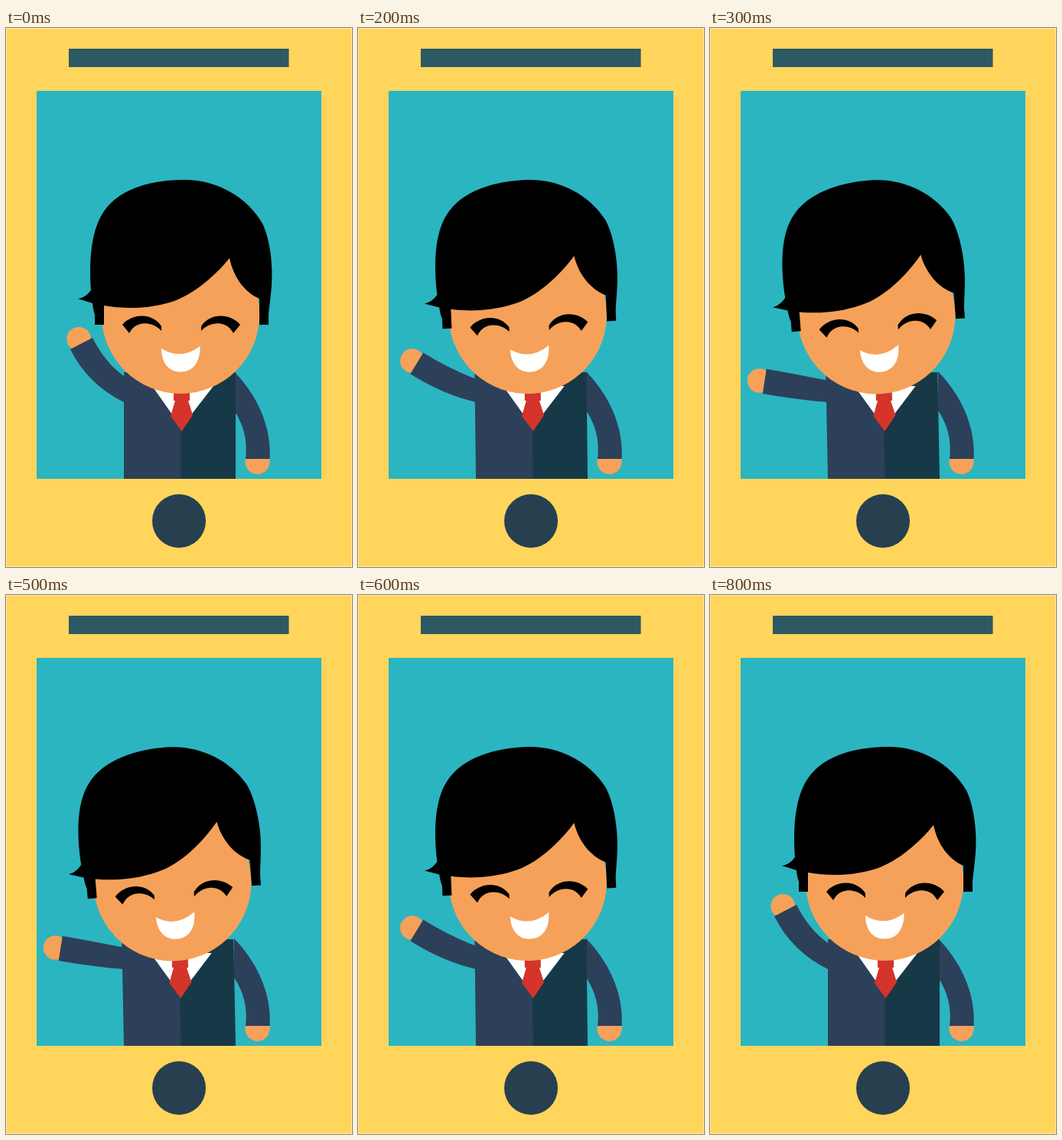
An HTML page with a canvas for the animation above (900 ms loop, 452 by 703 pixels).

```html
<!DOCTYPE html>
<html lang="en">
<head>
<meta charset="utf-8">
<title>Waving man on a phone</title>
<style>
  html, body { margin: 0; width: 100%; height: 100%; overflow: hidden; background: #fff; }
  canvas { display: block; }
</style>
</head>
<body>
<canvas id="stage" width="452" height="703"></canvas>
<script>
const ctx = document.getElementById('stage').getContext('2d');

const STEP = 100;
const STEPS = 9;
const ARM_SWING = -63 * Math.PI / 180;
const HEAD_TILT = -5.3 * Math.PI / 180;
const SHOULDER = [133.5, 463];
const NECK = [229, 509];

const YELLOW = '#ffd55c', TEAL = '#2bb5c1', SPEAKER = '#2d5963', BUTTON = '#283f50';
const SKIN = '#f6a159', JACKET = '#2d4059', SHADE = '#173847', TIE = '#d4342a';

function fillPath(d, color) {
  ctx.fillStyle = color;
  ctx.fill(new Path2D(d));
}

function rect(x, y, w, h, color) {
  ctx.fillStyle = color;
  ctx.fillRect(x, y, w, h);
}

function disc(x, y, r, color) {
  ctx.fillStyle = color;
  ctx.beginPath();
  ctx.arc(x, y, r, 0, Math.PI * 2);
  ctx.fill();
}

function turn([x, y], [px, py], angle) {
  const c = Math.cos(angle), s = Math.sin(angle);
  return [px + (x - px) * c - (y - py) * s, py + (x - px) * s + (y - py) * c];
}

function phone() {
  rect(0, 0, 452, 703, '#fff');
  rect(0.5, 0.5, 451, 702, YELLOW);
  rect(82, 27, 287.5, 24, SPEAKER);
  rect(40, 82, 372, 506, TEAL);
  disc(226, 643, 35, BUTTON);
}

function restingArm() {
  fillPath('M312.5 561H344.5V566A16 16 0 0 1 312.5 566Z', SKIN);
  fillPath('M298 448C325 476 347 515 344.7 562H313C316 537 310 517 298 499Z', JACKET);
}

function wavingArm(wave) {
  const at = (x, y) => turn([x, y], SHOULDER, ARM_SWING * wave);
  const low = at(84, 419), high = at(113, 404);
  const lowBend = at(107, 465), highBend = at(129, 436);

  disc(...at(95.2, 405.7), 15.8, SKIN);
  ctx.fillStyle = JACKET;
  ctx.beginPath();
  ctx.moveTo(...low);
  ctx.quadraticCurveTo(...lowBend, 154, 488);
  ctx.lineTo(160, 488);
  ctx.lineTo(160, 454);
  ctx.lineTo(154 - 4.5 * wave, 454 + 6 * wave);
  ctx.quadraticCurveTo(...highBend, ...high);
  ctx.fill();
}

// The torso leans while its base stays on the bottom of the screen.
function torso(wave) {
  const lean = 3.2 * wave / 138;
  ctx.save();
  ctx.transform(1, 0, lean, 1, -lean * 588, 0);
  fillPath('M154 449H229V588H154Z', JACKET);
  fillPath('M228.5 449H300V588H228.5Z', SHADE);
  fillPath('M191 467H271L229 521Z', '#fff');
  fillPath('M219 470H240V486H238L244 505L229.5 526L215 506L221 486H219Z', TIE);
  ctx.restore();
}

function eye() {
  fillPath('M152 387C164 373 190 370 203 389V395C191 382 170 381 161 398Z', '#000');
}

function head(wave) {
  ctx.save();
  ctx.translate(...NECK);
  ctx.rotate(HEAD_TILT * wave);
  ctx.translate(-NECK[0], -NECK[1]);

  disc(228, 373.7, 103.2, SKIN);
  fillPath('M94 353C102 352 107 347 111 342C108 300 112 262 128 239' +
    'C150 207 195 198 234 198C275 198 315 220 335 255' +
    'C345 275 349 310 347 335C346 350 344 362 343 374V387H331V353' +
    'C312 345 297 325 292 300C272 325 240 352 210 359' +
    'C180 367 152 366 128 362V387H116V374C114 368 113.5 364 113 359Z', '#000');

  eye();
  ctx.save();
  ctx.translate(458, 0);
  ctx.scale(-1, 1);
  eye();
  ctx.restore();

  fillPath('M203 418Q228 434 253.5 415C254 436 244 448.5 228 448.5C212 448.5 203 436 203 418Z', '#fff');
  ctx.restore();
}

function draw(now) {
  const step = Math.floor(now / STEP) % STEPS;
  const wave = (1 - Math.cos(step * Math.PI / 4)) / 2;

  phone();
  ctx.save();
  ctx.beginPath();
  ctx.rect(40, 82, 372, 506);
  ctx.clip();
  restingArm();
  wavingArm(wave);
  torso(wave);
  head(wave);
  ctx.restore();
}

const start = performance.now();

function tick() {
  draw(performance.now() - start);
  requestAnimationFrame(tick);
}

tick();
</script>
</body>
</html>
```
